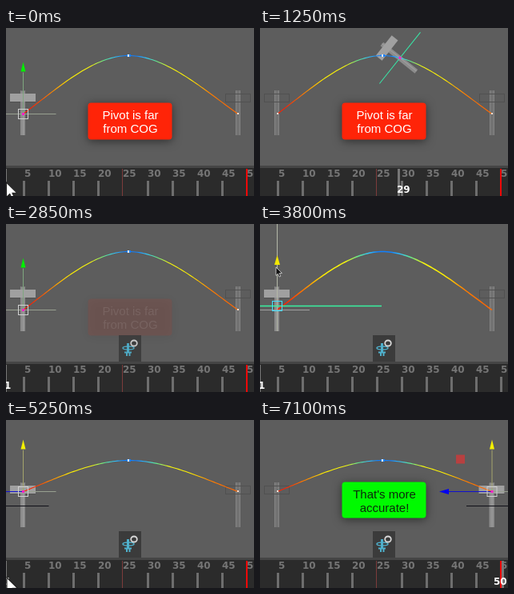
Recreate the animation shown at these times as an HTML page with a canvas. Size 310x210 px, loop 7.3 s.

```html
<!DOCTYPE html>
<html lang="en">
<head>
<meta charset="utf-8">
<title>Pivot and centre of gravity</title>
<style>
html, body { margin: 0; width: 100%; height: 100%; overflow: hidden; background: #5d5d5d; }
canvas { display: block; width: 310px; height: 210px; }
</style>
</head>
<body>
<canvas id="stage" width="310" height="210"></canvas>
<script>
const W = 310, H = 210, LOOP = 7300, STEP = 50;
const stage = document.getElementById('stage').getContext('2d');
const layer = document.createElement('canvas');
layer.width = W;
layer.height = H;
const over = layer.getContext('2d');

// Two setups: pivot low on the handle, then pivot at the head.
const LOW = { base: 107.5, peak: 34.5, arrow: '#00f000', shaft: '#7fa67f' };
const HIGH = { base: 89.5, peak: 50.5, arrow: '#f4f000', shaft: '#a5a56c', mark: true };

const clamp = (v, a = 0, b = 1) => Math.min(b, Math.max(a, v));
const ramp = (t, a, b) => clamp((t - a) / (b - a));

// Linear interpolation through [time, value] points, held at both ends.
function track(t, pts) {
  if (t <= pts[0][0]) return pts[0][1];
  for (let i = 1; i < pts.length; i++) {
    const [a, v] = pts[i - 1], [b, w] = pts[i];
    if (t <= b) return v + (w - v) * (t - a) / (b - a);
  }
  return pts[pts.length - 1][1];
}

const arcX = f => 21.5 + (f - 1) * 5.48;
const tickX = f => 22 + (f - 5) * 6.2;
const spin = f => (f - 1) / 49 * Math.PI * 10;

function arcY(f, rig) {
  const t = f < 25 ? (f - 1) / 24 : (50 - f) / 25;
  const h = 1.35 * (t ** 3 - 2 * t * t + t) + 3 * t * t - 2 * t ** 3;
  return rig.base + (rig.peak - rig.base) * h;
}

function rect(c, color, x, y, w, h) {
  c.fillStyle = color;
  c.fillRect(x, y, w, h);
}

function line(c, color, x1, y1, x2, y2, width = 1) {
  c.strokeStyle = color;
  c.lineWidth = width;
  c.beginPath();
  c.moveTo(x1, y1);
  c.lineTo(x2, y2);
  c.stroke();
}

function box(c, color, x, y, r) {
  c.strokeStyle = color;
  c.lineWidth = 1;
  c.strokeRect(x - r, y - r, 2 * r, 2 * r);
}

function poly(c, color, pts) {
  c.fillStyle = color;
  c.beginPath();
  pts.forEach(([x, y]) => c.lineTo(x, y));
  c.closePath();
  c.fill();
}

function ghost(c, x) {
  rect(c, '#737373', x - 3, 78, 6, 56);
  line(c, '#858585', x - 2.5, 78, x - 2.5, 134);
  line(c, '#858585', x + 2.5, 78, x + 2.5, 134);
  c.strokeStyle = '#505050';
  c.lineWidth = 1;
  c.strokeRect(x - 15.5, 82.5, 31, 10);
}

function path(c, rig, width) {
  const g = c.createLinearGradient(21, 0, 290, 0);
  const colors = ['#ff2000', '#ff8000', '#fff000', '#f4f410', '#60e890', '#30c0ff', '#1080ff'];
  const stops = [0.04, 0.13, 0.22, 0.32, 0.38, 0.43, 0.47];
  stops.forEach((s, i) => {
    g.addColorStop(s, colors[i]);
    g.addColorStop(1 - s, i ? colors[i] : '#ff6800');
  });
  c.strokeStyle = g;
  c.lineWidth = width;
  c.beginPath();
  for (let f = 1; f <= 50; f += 0.5) c.lineTo(arcX(f), arcY(f, rig));
  c.stroke();
}

function keys(c, rig) {
  rect(c, '#1a80ff', 151, rig.peak - 1.5, 5, 3);
  rect(c, '#fff', 152, rig.peak - 1.5, 2, 3);
  rect(c, '#ffe0d0', 21, rig.base - 1.5, 2, 2);
  rect(c, '#ffe0d0', 289, rig.base - 1.5, 2, 2);
}

// Origin is the pivot; the geometry itself keeps its place at rest.
function hammer(c, rig) {
  rect(c, '#8c8c8c', -3.5, 79 - rig.base, 6, 55);
  line(c, '#a0a0a0', 0, 79 - rig.base, 0, 134 - rig.base);
  rect(c, '#a0a0a0', -16.5, 82 - rig.base, 32, 10);
}

function gizmo(c, x, y, rig) {
  line(c, rig.shaft, x, y, x, y - 52);
  poly(c, rig.arrow, [[x, y - 65], [x - 3, y - 53], [x + 3, y - 53]]);
  if (rig.mark) {
    line(c, '#1010d0', x, y, x - 55, y);
    poly(c, '#0000f0', [[x - 66, y], [x - 54, y - 3.5], [x - 54, y + 3.5]]);
    rect(c, '#b84040', x - 45, y - 46, 11, 11);
  }
  box(c, '#d0d0d0', x, y, 6);
}

function cursor(c, x, y, fill, edge, s) {
  const pts = [[0, 0], [0, 16], [3.7, 12.6], [6.3, 18.5], [9, 17.3], [6.5, 11.6], [11.5, 11.4]];
  c.save();
  c.translate(x, y);
  c.scale(s, s);
  poly(c, fill, pts);
  c.strokeStyle = edge;
  c.lineWidth = 1;
  c.stroke();
  c.restore();
}

function timeline(c, frame, keyed) {
  rect(c, '#454545', 0, 172, W, 3);
  rect(c, '#2b2b2b', 0, 175, W, 35);
  c.font = 'bold 12px "DejaVu Sans", sans-serif';
  c.textAlign = 'left';
  for (let f = 5; f <= 50; f += 5) {
    const x = tickX(f);
    if (!keyed || f % 25) rect(c, '#6e6e6e', Math.round(x) - 1, 191, 3, 19);
    c.fillStyle = '#757575';
    c.fillText(f, x + (f > 5 ? 0 : 1), 186);
  }
  const x = Math.round(tickX(frame));
  rect(c, '#777', x + 1, 176, 3, 34);
  if (keyed) {
    rect(c, '#7c3c3c', 145, 176, 1, 34);
    rect(c, '#f00808', 300, 176, 2, 34);
  }
  c.fillStyle = '#fff';
  c.fillText(frame, Math.min(x + (frame < 10 ? 1 : 0), 292), 206);
}

function backdrop(c) {
  rect(c, '#5d5d5d', 0, 0, W, H);
  ghost(c, 21);
  ghost(c, 290);
}

function throwView(c, rig, frame, resting) {
  const x = arcX(frame), y = arcY(frame, rig);
  const posed = draw => {
    c.save();
    c.translate(x, y);
    c.rotate(spin(frame));
    draw();
    c.restore();
  };
  backdrop(c);
  posed(() => {
    hammer(c, rig);
    if (rig.mark) line(c, '#101018', -32, 18, 32, 18);
  });
  path(c, rig, 1.1);
  keys(c, rig);
  posed(() => line(c, resting ? '#98a090' : '#38e8a8', -41, 0, 41, 0));
  if (resting) gizmo(c, x, y, rig);
  rect(c, '#ff20c8', x - 1.5, y - 1.5, 3, 3);
  timeline(c, frame, true);
}

function editView(c, y) {
  backdrop(c);
  c.save();
  c.translate(21.5, LOW.base);
  hammer(c, LOW);
  c.restore();
  path(c, LOW, 1.5);
  line(c, '#a0a0a0', 0, 107.5, 62, 107.5);
  line(c, '#b4b8a8', 21.5, 0, 21.5, 134);
  line(c, '#38f0a0', 0, y + 0.5, 152, y + 0.5, 1.4);
  poly(c, '#f4e800', [[21.5, y - 63], [18, y - 51], [25, y - 51]]);
  box(c, '#40e0ff', 21.5, y + 0.5, 6);
  cursor(c, 20, y - 48, '#111', '#fff', 0.65);
  timeline(c, 1, false);
}

function label(c, alpha, y, h, fill, ink, lines) {
  if (alpha <= 0) return;
  c.save();
  c.globalAlpha = alpha;
  c.shadowColor = 'rgba(0,0,0,.5)';
  c.shadowBlur = 12;
  c.shadowOffsetY = 2;
  c.fillStyle = fill;
  c.beginPath();
  c.roundRect(102.5, y - 0.5, 105, h, 4);
  c.fill();
  c.shadowColor = 'transparent';
  c.fillStyle = ink;
  c.font = '15px "Liberation Sans", Arial, sans-serif';
  c.textAlign = 'center';
  lines.forEach((s, i) => c.fillText(s, 155.5, y + 20 + i * 17));
  c.restore();
}

function ellipse(c, color, x, y, rx, ry, width) {
  c.strokeStyle = color;
  c.lineWidth = width;
  c.beginPath();
  c.ellipse(x, y, rx, ry, 0, 0, Math.PI * 2);
  c.stroke();
}

function icon(c, alpha) {
  if (alpha <= 0) return;
  c.save();
  c.globalAlpha = alpha;
  rect(c, '#3b3b3b', 141, 139, 28, 33);
  const blue = '#4fb0cc';
  ellipse(c, blue, 153, 155, 7, 2, 1.5);
  line(c, blue, 152.5, 149, 152.5, 161, 3);
  line(c, blue, 148, 160.5, 157, 160.5, 2);
  line(c, blue, 151, 161, 151, 165, 2);
  line(c, blue, 154.5, 161, 154.5, 165, 2);
  ellipse(c, '#d8d8d8', 160, 149, 3.8, 3.5, 1.8);
  c.restore();
}

const FIRST = [[0, 1], [700, 43], [750, 49], [800, 50], [950, 50], [1650, 1]];
const SECOND = [[5250, 1], [5900, 16], [6050, 23], [6650, 42], [6850, 50]];
const DRAG = [[3650, 107], [3800, 102], [3850, 96], [4150, 88]];

function firstScene(c, t) {
  throwView(c, LOW, Math.round(track(t, FIRST)), t < 50 || t >= 1850);
  if (t < 200) cursor(c, 0.5, 193 + t * 0.1, '#fff', '#222', 1.15);
}

function lastScene(c, t) {
  const frame = Math.round(track(t, SECOND));
  throwView(c, HIGH, frame, t < 5300 || t >= 7100);
  const y = track(t, [[5250, 197], [6050, 204], [6300, 211]]);
  const x = track(t, [[5250, 1], [5300, tickX(frame) + 5]]);
  if (y < H) cursor(c, x, y, '#fff', '#222', 1.15);
}

function blend(draw, alpha) {
  draw(over);
  stage.globalAlpha = alpha;
  stage.drawImage(layer, 0, 0);
  stage.globalAlpha = 1;
}

function render(t) {
  const toEdit = ramp(t, 3100, 3800), toLast = ramp(t, 4400, 5200);
  const first = c => firstScene(c, t);
  const edit = c => editView(c, track(t, DRAG));
  const last = c => lastScene(c, t);

  if (toLast === 1) last(stage);
  else if (toEdit === 1) edit(stage);
  else first(stage);
  if (toEdit > 0 && toEdit < 1) blend(edit, toEdit);
  if (toLast > 0 && toLast < 1) blend(last, toLast);

  label(stage, 1 - ramp(t, 2400, 2900), 94, 46, '#ff2408', '#fff', ['Pivot is far', 'from COG']);
  label(stage, ramp(t, 5400, 5900), 78, 45, '#00fa00', '#0c2a0c', ["That's more", 'accurate!']);
  icon(stage, ramp(t, 2400, 2900));
}

const start = performance.now();
function tick() {
  const t = (performance.now() - start) % LOOP;
  render(Math.floor(t / STEP) * STEP);
  requestAnimationFrame(tick);
}
tick();
</script>
</body>
</html>
```
